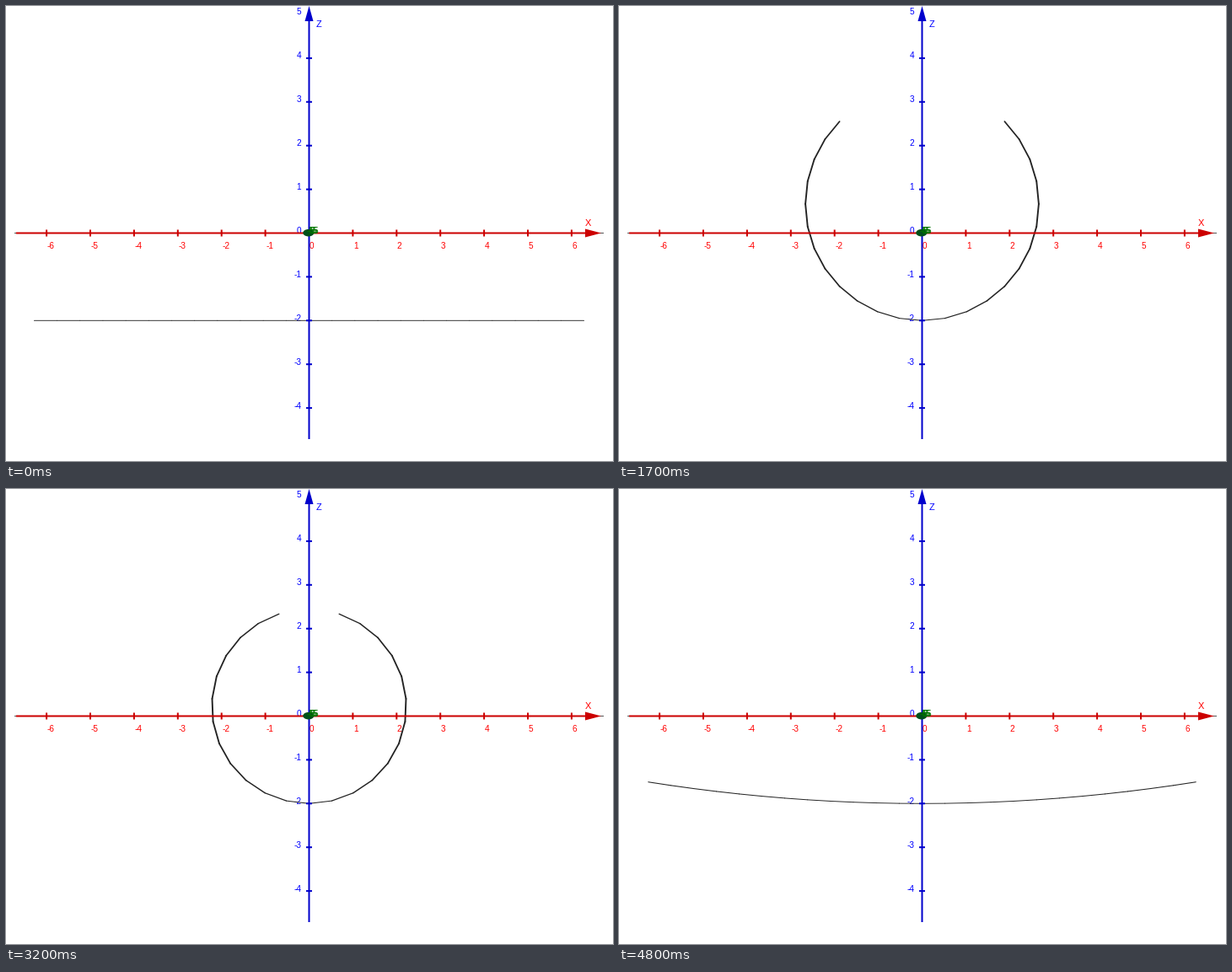
These frames come from a looping animation (720 px wide and 540 px high, 5 s). A matplotlib script:

```python
import numpy as np
import matplotlib.pyplot as plt
from matplotlib.animation import FuncAnimation
from matplotlib.collections import LineCollection
from matplotlib.patches import Ellipse, Polygon

WIDTH, HEIGHT, DPI = 720, 540, 72
CX, CY, UNIT = 359.5, 269.5, 51.9
RED, BLUE, GREEN = "#cc0000", "#0000cc", "#007300"
STEP_MS = 100
HALF_LOOP, HOLD, STEP = 2500, 500, 200

# Fraction of a full turn the strip is rolled up at each step.
ROLL = [0, .05, .1, .2, .3, .45, .6, .75, .85, .9, .95, 1]
ARC = np.linspace(-2 * np.pi, 2 * np.pi, 25)

fig = plt.figure(figsize=(WIDTH / DPI, HEIGHT / DPI), dpi=DPI, facecolor="white")
ax = fig.add_axes([0, 0, 1, 1])
ax.set_xlim(0, WIDTH)
ax.set_ylim(HEIGHT, 0)
ax.axis("off")


def line(xs, ys, color, width, z):
    ax.plot(xs, ys, color=color, lw=width, solid_capstyle="butt",
            snap=False, zorder=z)


def label(x, y, text, color, size=10, ha="left", z=2):
    ax.text(x, y, text, color=color, fontsize=size, ha=ha, va="baseline",
            family="Liberation Sans", zorder=z)


def draw_x_axis():
    line([10, 709], [CY, CY], "#555555", 1, 4)
    line([12, 690], [CY, CY], RED, 2, 5)
    ax.add_patch(Polygon([(706, CY), (687, CY - 5), (687, CY + 5)],
                         fc=RED, lw=0, zorder=5))
    for n in range(-6, 7):
        x = CX + n * UNIT
        if n:
            line([x, x], [CY - 4, CY + 4], RED, 2, 5)
        label(x + 0.5, 288.5, str(n), "#ff0000")
    label(687, 261, "X", "#ff0000", 11)


def draw_z_axis():
    line([CX, CX], [514, 15], BLUE, 2, 6)
    ax.add_patch(Polygon([(CX, 0), (CX - 5, 18), (CX + 5, 18)],
                         fc=BLUE, lw=0, zorder=6))
    for n in range(-4, 6):
        y = CY - n * UNIT
        if n not in (0, 5):
            line([CX - 3.5, CX + 3.5], [y, y], BLUE, 2, 6)
        label(350.3, y + 0.5, str(n), "#0000ff", ha="right")
    label(368, 25, "Z", "#0000ff", 11)


def draw_y_axis():
    """The y axis points at the viewer, so its labels pile up."""
    ax.add_patch(Ellipse((CX - 0.7, CY - 0.3), 13, 8.5, fc="#00501a",
                         lw=0, zorder=7))
    for dx in (0, 1, 2):
        label(357 + dx, 269.5, "-5", GREEN, z=8)
        label(362.5 + dx, 269.5, "5", GREEN, z=8)


def strip(roll):
    """Points of a strip of constant length bent to a circular arc."""
    curvature = roll / 2
    if curvature == 0:
        x, z = ARC, np.full_like(ARC, -2)
    else:
        x = np.sin(ARC * curvature) / curvature
        z = (1 - np.cos(ARC * curvature)) / curvature - 2
    return np.column_stack([CX + x * UNIT, CY - z * UNIT])


def roll_at(ms):
    half, phase = divmod(ms, HALF_LOOP)
    k = 0 if phase < HOLD else 1 + (phase - HOLD) // STEP
    return ROLL[-1 - k if half else k]


draw_x_axis()
draw_z_axis()
draw_y_axis()
curve = LineCollection([], colors="#222222", capstyle="round", zorder=3)
curve.set_snap(False)
ax.add_collection(curve, autolim=False)


def update(i):
    points = strip(roll_at(i * STEP_MS))
    segments = np.stack([points[:-1], points[1:]], axis=1)
    delta = np.diff(points, axis=0)
    steepness = np.abs(delta[:, 1]) / np.hypot(*delta.T)
    curve.set_segments(segments)
    curve.set_linewidths(0.9 + steepness)
    return curve,


anim = FuncAnimation(fig, update, frames=2 * HALF_LOOP // STEP_MS,
                     interval=STEP_MS, repeat=True, repeat_delay=0)
plt.show()
```
